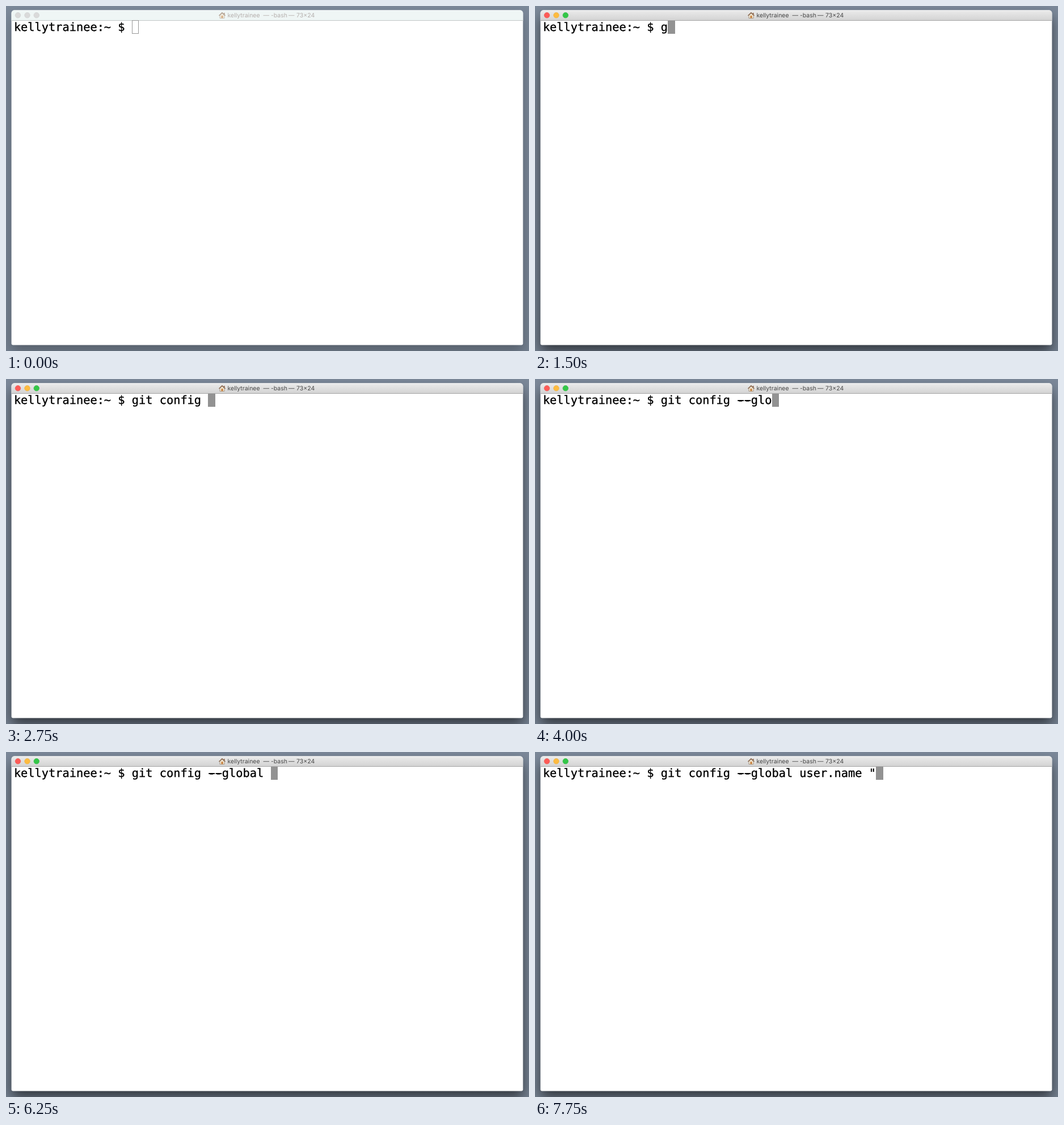
An HTML page that plays this animation: 922x608 px, repeating every 8 s.

```html
<!DOCTYPE html>
<html lang="en">
<head>
<meta charset="utf-8">
<title>Terminal</title>
<style>
  html, body { margin: 0; width: 100%; height: 100%; overflow: hidden; background: #75818f; }
  svg { display: block; width: 922px; height: 608px; }
  .mono { font: 20.322px "DejaVu Sans Mono", monospace; white-space: pre; text-rendering: geometricPrecision; stroke: #000; stroke-width: .35px; }
  .title { font: 10.5px Inter, sans-serif; text-rendering: geometricPrecision; }
  #shadow { filter: blur(11px); }
</style>
</head>
<body>
<svg viewBox="0 0 922 608">
  <defs>
    <linearGradient id="desk" x2="0" y2="1">
      <stop offset="0" stop-color="#7b8899"/>
      <stop offset="1" stop-color="#737f8f"/>
    </linearGradient>
    <linearGradient id="bar" x2="0" y2="1">
      <stop offset="0" stop-color="#ebebeb"/>
      <stop offset="1" stop-color="#d2d2d2"/>
    </linearGradient>
  </defs>

  <rect width="922" height="608" fill="url(#desk)"/>
  <rect id="shadow" x="10" y="20" width="901" height="589" rx="6"/>
  <path d="M9.6 26V12.5a5 5 0 0 1 5-5H906.4a5 5 0 0 1 5 5V594.6a3 3 0 0 1-3 3H12.6a3 3 0 0 1-3-3Z" fill="#fff"/>
  <path id="titleBar" d="M9.6 26V12.5a5 5 0 0 1 5-5H906.4a5 5 0 0 1 5 5V26Z"/>
  <path d="M14 8H907" stroke="#fff" stroke-opacity=".5"/>
  <path id="divider" d="M9.6 25.5H911.4"/>

  <g id="lights">
    <circle cx="21" cy="16.3" r="4.8"/>
    <circle cx="37.5" cy="16.3" r="4.8"/>
    <circle cx="53.8" cy="16.3" r="4.8"/>
  </g>

  <g id="house">
    <path d="M377 16.5L381 12.8L385 16.5V21.5H377Z" fill="#f3e6cf" stroke="#8d7a66" stroke-width=".7"/>
    <path d="M384 12H385.5V15H384Z" fill="#8a5a3c"/>
    <path d="M375.5 17L381 11.8L386.5 17" fill="none" stroke="#8c6a50" stroke-width="1.5"/>
    <path d="M379.6 17H382.4V21.5H379.6Z" fill="#c47a35"/>
  </g>

  <g id="caption" class="title">
    <text x="390.5" y="20.3" id="owner"></text>
    <text y="20.3"><tspan x="453.5">—</tspan><tspan x="467">-bash</tspan><tspan x="498">—</tspan><tspan x="512">73×24</tspan></text>
  </g>

  <rect id="caret"/>
  <text id="line" class="mono" x="13.9" y="44" xml:space="preserve"></text>
  <path id="dashes" stroke="#000" stroke-width="2"/>

  <path id="pointer" d="M0 0V11.2L2.6 8.8L4.4 13L6.3 12.2L4.6 8.1H8Z"
        stroke="#fff" stroke-width="1.6" paint-order="stroke" stroke-linejoin="round"
        style="filter: drop-shadow(0 1px 1px rgba(0,0,0,.3))"/>
</svg>

<script>
const $ = id => document.getElementById(id);
const set = (el, attrs) => Object.entries(attrs).forEach(([k, v]) => el.setAttribute(k, v));

const LOOP = 8000, LEFT = 13.9, CELL = 12.235;
const user = "kellytrainee";
const prompt = user + ":~ $ ";
const command = 'git config --global user.name "';

// [time in ms, characters typed so far]
const keys = [
  [1500, 1], [1750, 3], [2000, 4], [2250, 8], [2500, 10], [2750, 11],
  [3500, 13], [3750, 14], [4000, 16], [4250, 18], [4500, 19],
  [6250, 20], [6500, 22], [6750, 24], [7000, 26], [7250, 28], [7500, 30], [7750, 31]
];

const cellX = col => LEFT + col * CELL;
const typedAt = t => keys.reduce((n, [at, count]) => t >= at ? count : n, 0);

function drawWindow(active) {
  set($("shadow"), { opacity: active ? 0.55 : 0.25 });
  set($("titleBar"), { fill: active ? "url(#bar)" : "#eff6f5" });
  set($("divider"), { stroke: active ? "#a6a6a6" : "#c2c7c6" });
  set($("house"), { opacity: active ? 1 : 0.6 });
  set($("caption"), { fill: active ? "#474747" : "#b5afad" });
  const colors = active ? ["#fc5b57", "#fdbb40", "#34c648"] : Array(3).fill("#dadada");
  const rims = active ? ["#ec514b", "#eaae38", "#2eb93f"] : Array(3).fill("#cbcfce");
  [...$("lights").children].forEach((dot, i) =>
    set(dot, { fill: colors[i], stroke: rims[i], "stroke-width": 0.6 }));
}

function drawLine(text, active) {
  $("line").textContent = text;

  // lengthen hyphens so that neighbours almost touch
  let d = "";
  [...text].forEach((ch, i) => {
    if (ch === "-") d += `M${cellX(i) + 0.8} 38h10.7`;
  });
  set($("dashes"), { d });

  const x = Math.round(cellX(text.length));
  const width = Math.round(cellX(text.length + 1) + 0.25) - x;
  set($("caret"), active
    ? { x, y: 26, width, height: 23, fill: "#929292", stroke: "none" }
    : { x: x + 0.5, y: 25.5, width: width - 1, height: 23, fill: "none", stroke: "#999" });
}

function drawPointer(t) {
  const visible = t >= 250 && t < 750;
  const spot = t < 500 ? "750.5 230.5" : "746 230";
  set($("pointer"), { transform: `translate(${spot})`, visibility: visible ? "visible" : "hidden" });
}

function render(t) {
  const active = t >= 500;
  drawWindow(active);
  drawLine(prompt + command.slice(0, typedAt(t)), active);
  drawPointer(t);
}

$("owner").textContent = user;
const start = performance.now();
function tick() {
  render((performance.now() - start) % LOOP);
  requestAnimationFrame(tick);
}
tick();
</script>
</body>
</html>
```
